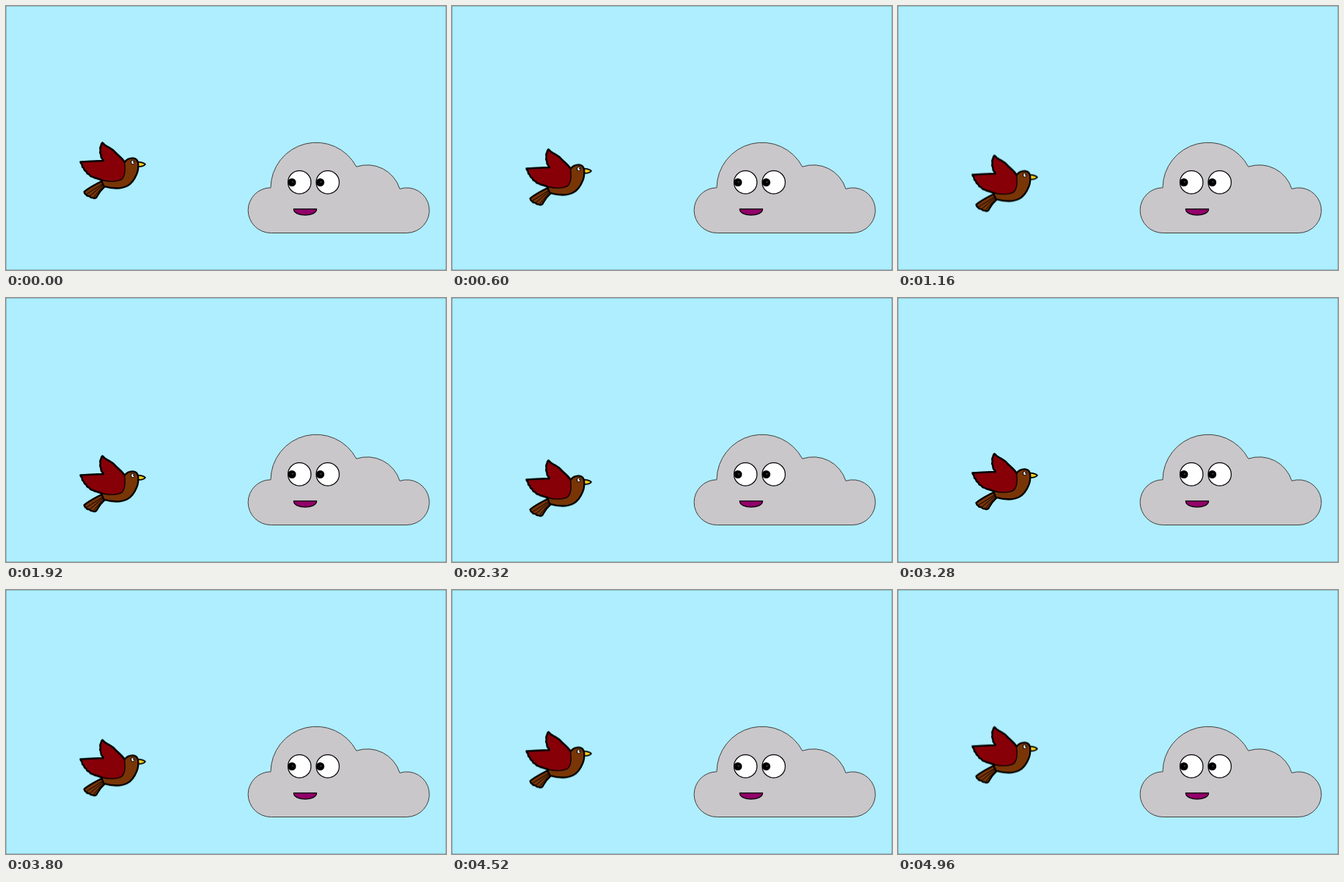
Recreate the animation shown at these times as an HTML page. Size 600 px wide and 360 px high, loop 5000 ms.

```html
<!DOCTYPE html>
<html lang="en">
<head>
<meta charset="utf-8">
<title>Bird and cloud</title>
<style>
  html, body { margin: 0; width: 100%; height: 100%; overflow: hidden; background: #aeeeff; }
  svg { display: block; width: 600px; height: 360px; }
  path { stroke-linejoin: round; stroke-linecap: round; }
</style>
</head>
<body>
<svg viewBox="0 0 600 360">
  <rect width="600" height="360" fill="#aeeeff" stroke="#000" stroke-width=".4"/>

  <g id="cloud" stroke="#000">
    <path fill="#c9c7ca" stroke="#404040" stroke-width="1"
      d="M361 309.5A30.85 30.85 0 0 1 361 247.8A62 62 0 0 1 477.800 219.200A46.500 46.500 0 0 1 537 249.400A30.800 30.800 0 1 1 546.500 309.500Z"/>
    <g fill="#fff" stroke-width="1.200">
      <circle cx="400.200" cy="240.400" r="15.700"/>
      <circle cx="438.700" cy="240.400" r="15.700"/>
    </g>
    <g stroke="none">
      <circle cx="389.900" cy="240.500" r="5.600"/>
      <circle cx="428.500" cy="240.500" r="5.600"/>
    </g>
    <g stroke="none" fill="#333">
      <circle cx="390.800" cy="240" r="1.200"/>
      <circle cx="429.400" cy="240" r="1.200"/>
    </g>
    <path fill="#93006a" stroke-width="1.200" d="M392.300 276.800H423.600C423.600 288 392.300 288 392.300 276.800Z"/>
  </g>

  <g id="bird" stroke="#000" stroke-width="2.300">
    <path fill="#793506" d="M131 238.500C123 243 114 247 106.500 253.300C107.500 254.500 106.500 256.500 109.500 257.300C110 260 113 258.500 114.300 259.800C115 262.500 118 260.700 119 261.700C121 263 123.500 261.500 124.500 259C127 254.500 130.500 250 135 246Z"/>
    <path fill="none" stroke-width="1" d="M131 243L110.500 256M132 244L115 258.500M133 245L120 260"/>
    <path fill="#ffd21a" stroke-width="1.800" d="M179.300 212.600C184 212.800 188 213.800 190 215.800C188 218.600 184 219.200 180 218.800Z"/>
    <path fill="#793506" d="M161.500 213C164 209.500 168.500 207.200 173 207.300C177.500 207.600 180 211 180.300 215.500C180.600 220.500 180.300 224.500 178.300 229C175.500 236 171 242.500 165 245.500C158 249 146 249.300 133.500 245.800L130 238Z"/>
    <path id="wing" fill="#870008" stroke-width="1.300" d="M161.500 212.500C162.800 222 162.500 234 156 237.200C150 239.500 140 239.500 131 237.500L132.500 211L131.300 186.500Z"/>
    <path fill="#870008" stroke-width="2.500" d="M161.500 212.500C158.500 207.500 153.500 204 149.500 200C145.500 195 140 193 136.500 190.500C134 189.500 133.500 187.500 131.300 186.500C129 188.500 130 191 128.800 192C127.300 194.500 129.500 196 128.500 198C127.500 200.500 130 202 129.500 204.500C129.300 207 132 208.500 132.800 211C121 211 111 212.300 101.500 212.400C101.500 215 104.500 215.500 103.800 217.700C103.500 220.500 106.500 220 106.500 222.500C106.500 225 109.500 224.500 110 226.800C110 229.500 113.500 228.700 114.500 231C115.500 233.500 118.500 232 120 234C124 235 127 236 131 237.500"/>
    <g stroke="none">
      <ellipse cx="172.800" cy="213" rx="2.700" ry="3"/>
      <ellipse cx="172.900" cy="213" rx="1.800" ry="2.300" fill="#fff"/>
      <circle cx="173.900" cy="212.600" r="1"/>
    </g>
  </g>
</svg>
<script>
  const drop = 37.8;
  const at = y => ({ transform: `translateY(${y}px)` });
  document.getElementById('bird').animate(
    [at(0), at(drop), at(0)],
    { duration: 5000, iterations: Infinity, easing: 'linear' }
  );
</script>
</body>
</html>
```
